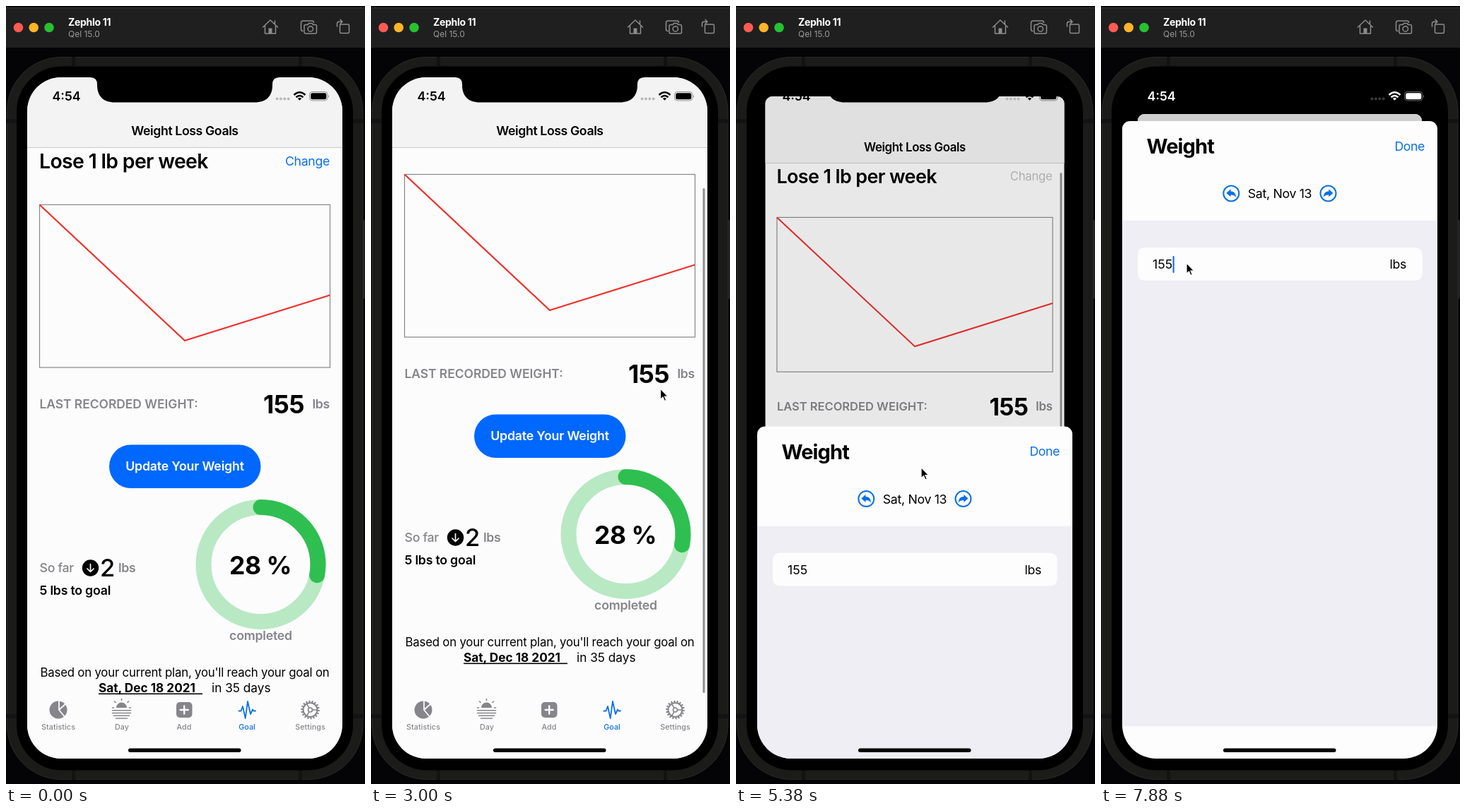
Animation of 508 by 1102 pixels, one loop 8000 ms. Source, as an HTML page:

```html
<!DOCTYPE html>
<html lang="en">
<head>
<meta charset="utf-8">
<title>Weight Loss Goals</title>
<style>
  html, body { margin: 0; width: 100%; height: 100%; overflow: hidden; background: #040406; }
  svg { display: block; width: 508px; height: 1102px; }
  text { font: 400 17.7px Inter, sans-serif; letter-spacing: -.3px; }
  .semi { font-weight: 600; }
  .mid { text-anchor: middle; }
  .end { text-anchor: end; }
  .grey { fill: #85858a; }
  .blue { fill: #0a6fe8; }
  .white { fill: #fff; }
  .title { font-size: 28.4px; font-weight: 600; letter-spacing: -.65px; }
  .sheet-title { font-size: 29px; font-weight: 700; letter-spacing: -.9px; }
  .big { font-size: 35.5px; font-weight: 700; letter-spacing: -.5px; }
  .caps { font-size: 17.4px; font-weight: 600; letter-spacing: 0; }
  .plan { font-size: 16.8px; letter-spacing: -.2px; }
  .date { font-size: 17.2px; letter-spacing: 0; }
  .bold { font-weight: 700; }
  .tabs text { font-size: 10.7px; font-weight: 500; letter-spacing: .1px; text-anchor: middle; }
  .line { fill: none; stroke-linecap: round; stroke-linejoin: round; }
  #status { color: #000; }
  #status.light { color: #fff; }
  #status.light .dots { fill: #3a3a3a; }
  .dots { fill: #b9b9bb; }
</style>
</head>
<body>
<svg viewBox="0 0 508 1102">
  <defs>
    <clipPath id="screen"><rect x="30" y="101" width="446" height="965" rx="48"/></clipPath>
    <clipPath id="cardEdge"><rect x="30" y="101" width="446" height="965" rx="11"/></clipPath>
    <g id="bent">
      <circle r="11" fill="none" stroke="#0a6fe8" stroke-width="2"/>
      <path d="M-7 -.6 -.8 -6V-3C4 -3 6.6 .4 6.6 5.4 5 2.8 3 1.9 -.8 1.9V4.8Z" fill="#0a6fe8"/>
    </g>
  </defs>

  <!-- window toolbar -->
  <rect y="2" width="508" height="57" fill="#1f1f1f"/>
  <rect y="2" width="508" height="1" fill="#3a3a3a"/>
  <circle cx="17.5" cy="30.5" r="6.8" fill="#fe5b52"/>
  <circle cx="39.2" cy="30.5" r="6.8" fill="#fdb427"/>
  <circle cx="61" cy="30.5" r="6.8" fill="#27c132"/>
  <text x="88" y="28" class="white bold" style="font-size:14px">Zephlo 11</text>
  <text x="88" y="44" fill="#9a9a9a" style="font-size:12px;letter-spacing:0">Qel 15.0</text>
  <g class="line" stroke="#8c8c8c" stroke-width="1.5">
    <path d="M363.5 30 374 20 384.500 30M380.500 25.500V21M366.500 28.500V39H381.500V28.500"/>
    <rect x="371.500" y="31.500" width="5" height="7.500" fill="#8c8c8c" stroke="none"/>
    <path d="M420 35.500C418 35.500 417.500 34.500 417.500 33V24C417.500 22 418.500 21 420.500 21H433C435 21 435.500 22 435.500 23.500"/>
    <path d="M424 26.500H427L428.500 24.500H433L434.500 26.500H437.500Q439.500 26.500 439.500 28.500V37Q439.500 39 437.500 39H424Q422 39 422 37V28.500Q422 26.500 424 26.500Z"/>
    <circle cx="430.800" cy="32.400" r="3.700"/>
    <rect x="472.500" y="26" width="13" height="12.500" rx="1.500"/>
    <path d="M468.500 29V25Q468.500 22.300 471.500 22.300H475.500M473 19.300 476 22.300 473 25.300"/>
  </g>

  <!-- phone body -->
  <rect x="503" y="303" width="5" height="112" rx="1.500" fill="#222"/>
  <rect x="1.500" y="72.500" width="503.500" height="1023" rx="77" fill="#1b1b1a" stroke="#2a2a29"/>
  <path d="M93 72h5v13h-5zM414 72h5v13h-5zM1 160h14v6H1zM491 160h14v6h-14zM1 1003h14v6H1zM491 1003h14v6h-14zM93 1082h5v14h-5zM414 1082h5v14h-5z" fill="#131313"/>
  <rect x="15" y="85.500" width="476" height="997" rx="64" fill="#000"/>

  <g clip-path="url(#screen)">
    <g id="card"><g clip-path="url(#cardEdge)">
      <rect x="30" y="101" width="446" height="965" fill="#fcfcfd"/>
      <g id="page">
        <text x="47" y="230" class="title">Lose 1 lb per week</text>
        <text id="change" x="458" y="226" class="end blue">Change</text>
        <rect x="47.500" y="281.500" width="411" height="230.500" fill="none" stroke="#88888a" stroke-width="1.200"/>
        <path d="M47.500 281.500 253 474 458.500 409.500" fill="none" stroke="#f0302a" stroke-width="2.200"/>
        <text x="47.500" y="570" class="caps grey">LAST RECORDED WEIGHT:</text>
        <text x="422" y="577" class="big end">155</text>
        <text x="458" y="570" class="semi grey end">lbs</text>
        <rect x="146" y="621.500" width="214.500" height="61.500" rx="30.700" fill="#0068ff"/>
        <text x="253" y="658" class="semi white mid" style="letter-spacing:-.17px">Update Your Weight</text>
        <circle cx="360.500" cy="791" r="81" fill="none" stroke="#b8e9c3" stroke-width="22"/>
        <circle cx="360.500" cy="791" r="81" class="line" stroke="#2fbf50" stroke-width="22" pathLength="100" stroke-dasharray="28 100" transform="rotate(-90 360.500 791)"/>
        <text x="360" y="805" class="big mid">28 %</text>
        <text x="360.500" y="898" class="semi grey mid" style="letter-spacing:-.2px">completed</text>
        <text x="47.500" y="801.500" class="grey" style="font-weight:500">So far</text>
        <circle cx="119.500" cy="796" r="11.700" fill="#000"/>
        <path d="M119.500 790.500V801M115 797 119.500 801.500 124 797" class="line" stroke="#fff" stroke-width="1.700"/>
        <text x="133" y="808" style="font-size:34.500px;font-weight:500">2</text>
        <text x="159" y="801.500" class="semi grey">lbs</text>
        <text x="47.500" y="833.500" class="semi" style="letter-spacing:-.2px">5 lbs to goal</text>
        <text x="253" y="950" class="plan mid">Based on your current plan, you'll reach your goal on</text>
        <text x="131" y="971.500" class="date bold">Sat, Dec 18 2021</text>
        <rect x="131" y="973.500" width="147" height="1.600"/>
        <text x="291" y="971.500" class="date">in 35 days</text>
      </g>

      <rect x="30" y="101" width="446" height="99" fill="#f3f3f4"/>
      <rect x="30" y="200" width="446" height="1" fill="#c9c9c6"/>
      <text x="253" y="183" class="semi mid" style="letter-spacing:-.4px">Weight Loss Goals</text>
      <rect id="bar" x="469.500" width="3" rx="1.500" fill="#8f8f91"/>

      <rect x="30" y="976.500" width="436" height="90" fill="#fcfcfd"/>
      <g class="tabs grey">
        <circle cx="74" cy="997" r="12.500"/>
        <path d="M75 983V997L86 987M75 997 84 1008" class="line" stroke="#fcfcfd" stroke-width="1.800"/>
        <text x="74" y="1025">Statistics</text>
        <path d="M156 994A7.500 7.500 0 0 1 171 994Z"/>
        <path d="M163.500 981.500V983.500M153.500 985 155 986.500M173.500 985 172 986.500M150.500 994H152.500M174.500 994H176.500M150.500 997.800H176.500M150.500 1001.500H176.500M152.500 1005.200H174.500M155.500 1009H171.500" class="line" stroke="#85858a" stroke-width="1.600"/>
        <text x="164" y="1025">Day</text>
        <rect x="241" y="986" width="22.500" height="22" rx="5"/>
        <path d="M252.200 991.500V1002.500M246.700 997H257.700" class="line" stroke="#fcfcfd" stroke-width="2.400"/>
        <text x="252" y="1025">Add</text>
        <path d="M329.500 998.500H332.500L335 992 338.700 1009 342 985 346 1003 349 996.500 350.500 998.500H353" class="line" stroke="#0a6fe8" stroke-width="1.800"/>
        <text x="341" y="1025" class="blue">Goal</text>
        <g fill="none" stroke="#85858a">
          <circle cx="430.500" cy="997" r="12" stroke-width="2.600" pathLength="72" stroke-dasharray="2 2"/>
          <circle cx="430.500" cy="997" r="10" stroke-width="2"/>
          <circle cx="430.500" cy="997" r="3" stroke-width="1.600"/>
          <path d="M433.500 997H440M429 994.400 425.700 988.700M429 999.600 425.700 1005.300" stroke-width="1.600"/>
        </g>
        <text x="430.500" y="1025">Settings</text>
      </g>
      <rect id="dim" x="30" y="101" width="446" height="965" opacity="0"/>
    </g></g>

    <!-- sheet, drawn from its own top edge -->
    <g id="sheet">
      <rect x="30" width="446" height="960" rx="11" fill="#fdfdfd"/>
      <rect x="30" y="141" width="446" height="716" fill="#eeeef4"/>
      <text x="64.500" y="46" class="sheet-title">Weight</text>
      <text x="458" y="41.500" class="blue end" style="letter-spacing:-.4px">Done</text>
      <use href="#bent" x="184.300" y="102.500"/>
      <use href="#bent" transform="translate(321.500 102.500) scale(-1 1)"/>
      <text x="253" y="109" class="mid">Sat, Nov 13</text>
      <rect x="52" y="179" width="402.500" height="47" rx="9.500" fill="#fdfdfd"/>
      <text x="73" y="209" style="letter-spacing:0">155</text>
      <text x="432" y="209" class="end">lbs</text>
      <rect id="caret" x="101.500" y="191" width="2.200" height="24" rx="1" fill="#1a6ff0"/>
    </g>
  </g>

  <path d="M119 99V101Q129 101 129 111V112C129 128 138 136.500 154 136.500H352C368 136.500 377 128 377 112V111Q377 101 387 101V99Z"/>
  <g id="status" fill="currentColor">
    <text x="85.500" y="134" class="semi mid" style="letter-spacing:0">4:54</text>
    <g class="dots">
      <circle cx="383.500" cy="131.500" r="2"/><circle cx="388.900" cy="131.500" r="2"/>
      <circle cx="394.300" cy="131.500" r="2"/><circle cx="399.700" cy="131.500" r="2"/>
    </g>
    <path d="M407.500 126Q415.500 118.500 423.500 126M410.500 129.300Q415.500 124.800 420.500 129.300" fill="none" stroke="currentColor" stroke-width="2.500"/>
    <path d="M412.800 131Q415.500 128.800 418.200 131L415.500 133.800Z"/>
    <rect x="429.500" y="121.500" width="25.500" height="12.500" rx="4" fill="none" stroke="currentColor" opacity=".4"/>
    <rect x="431.200" y="123.200" width="22.100" height="9.100" rx="2.500"/>
    <path d="M456.300 125.700Q458 127.700 456.300 129.900Z" opacity=".5"/>
  </g>
  <rect x="173" y="1051.500" width="159.500" height="5.500" rx="2.700"/>
  <path id="cursor" d="M0 0V15.200L3.500 12 5.900 17.500 8.300 16.500 6 11.200H10.700Z" stroke="#fff" stroke-width="1.200"/>
</svg>

<script>
const LOOP = 8000, STEP = 125, SHEET_AT = 5278, CARET_AT = 7870;
const el = id => document.getElementById(id);
const set = (id, attrs) => {
  for (const key in attrs) el(id).setAttribute(key, attrs[key]);
};

// time, x, y
const pointer = [
  [1600, 520, 690], [2200, 406, 618], [2500, 406, 591.500], [3000, 409.500, 542],
  [3375, 410, 534], [3750, 408, 536], [4625, 260, 602], [5000, 262, 653.500],
  [6375, 262, 653.500], [7500, 121, 364]
];
// time, overscroll
const drag = [[2200, 0], [2500, 13], [3000, 43], [3375, 46], [3625, 46], [4125, 0]];

function track(keys, t) {
  const next = keys.findIndex(k => k[0] > t);
  if (next === 0) return keys[0].slice(1);
  if (next < 0) return keys[keys.length - 1].slice(1);
  const a = keys[next - 1], b = keys[next];
  const u = (t - a[0]) / (b[0] - a[0]), s = u * u * (3 - 2 * u);
  return a.slice(1).map((v, i) => v + (b[i + 1] - v) * s);
}

// critically damped spring from 0 to 1
function spring(ms) {
  const w = 0.018 * Math.max(0, ms);
  return 1 - (1 + w) * Math.exp(-w);
}

function draw(t) {
  const [x, y] = track(pointer, t);
  const [off] = track(drag, t);
  const p = spring(t - SHEET_AT);
  const scale = 1 - 0.0975 * p;

  set("cursor", { transform: `translate(${x} ${y})` });
  set("page", { transform: `translate(0 ${-off})` });
  set("bar", { y: 215 + off, height: 758 - off, opacity: Math.min(1, Math.max(0, (t - 2200) / 200)) });
  set("card", { transform: `translate(253 ${101 + 52 * p}) scale(${scale}) translate(-253 -101)` });
  set("dim", { opacity: 0.15 * p });
  set("sheet", { transform: `translate(0 ${1066 - 903 * p})`, visibility: p > 0 ? "visible" : "hidden" });
  set("caret", { opacity: t >= CARET_AT ? 1 : 0 });
  el("change").style.fill = p > 0 ? "#bdbdbf" : "";
  el("status").classList.toggle("light", p > 0.7);
}

const start = performance.now();
function tick() {
  const t = (performance.now() - start) % LOOP;
  draw(Math.floor(t / STEP) * STEP);
  requestAnimationFrame(tick);
}
tick();
</script>
</body>
</html>
```
